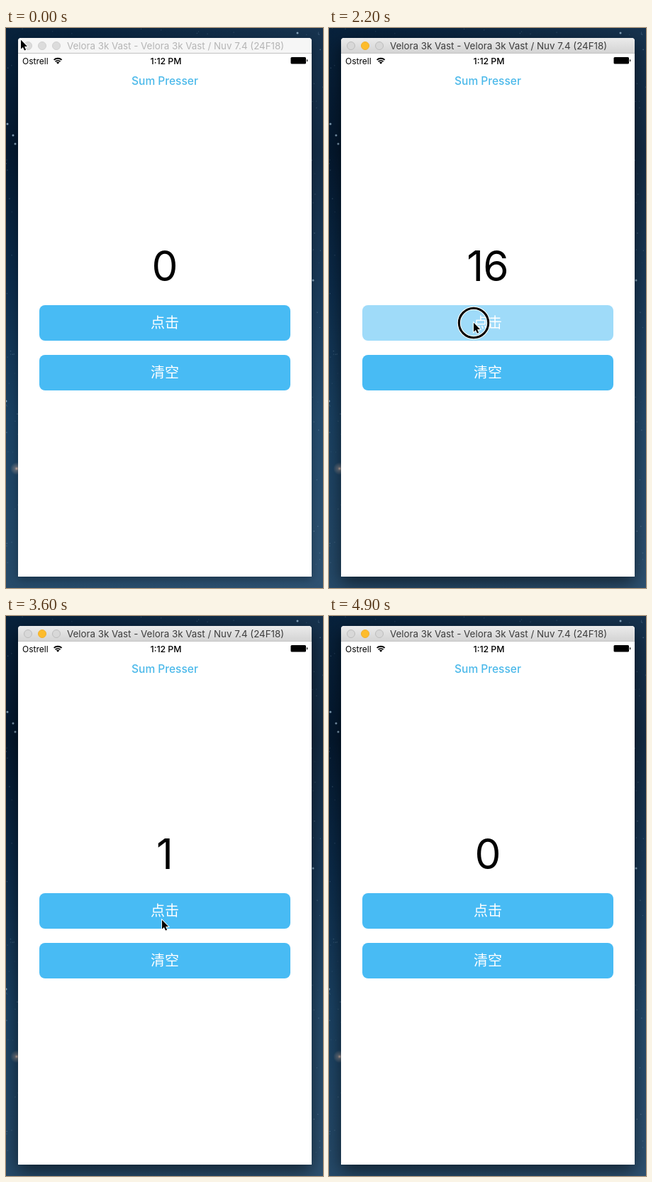
An HTML page that plays this animation: 447 by 788 pixels, repeating every 5000 ms.

```html
<!DOCTYPE html>
<html lang="zh-CN">
<head>
<meta charset="utf-8">
<title>Counter</title>
<style>
  html, body { margin: 0; width: 100%; height: 100%; overflow: hidden; background: #0b2744; }
  svg { display: block; width: 447px; height: 788px; font-family: Inter, "Open Sans", sans-serif; }
  .mid { text-anchor: middle; }
  .shadow { fill: #fff; filter: drop-shadow(0 4px 6px rgba(0, 0, 0, .3)); }
  .bar { fill: #f6f6f6; }
  .title { font-size: 13.35px; fill: #b5b5b5; }
  .light { fill: #dcdcdc; stroke: #d0d0d0; }
  .active .shadow { filter: drop-shadow(0 9px 12px rgba(0, 0, 0, .55)); }
  .active .bar { fill: url(#chrome); }
  .active .title { fill: #3c3c3c; }
  .active .light { fill: #d8d8d8; stroke: #bdbdbd; }
  .active .light.min { fill: #fdbc2c; stroke: #f0b02e; }
  .button rect { fill: #48bbf4; }
  .button text { fill: #fff; font: 300 20px "Noto Sans CJK SC", "Noto Sans CJK", sans-serif; }
  .pressed { opacity: .52; }
  #count { font-size: 58.5px; letter-spacing: -.8px; }
</style>
</head>
<body>
<svg id="stage" viewBox="0 0 447 788">
  <defs>
    <linearGradient id="sky" x2="0" y2="1">
      <stop offset="0" stop-color="#08223c"/>
      <stop offset=".22" stop-color="#04182e"/>
      <stop offset=".45" stop-color="#0b2a48"/>
      <stop offset=".7" stop-color="#1a4162"/>
      <stop offset="1" stop-color="#264a69"/>
    </linearGradient>
    <linearGradient id="haze">
      <stop offset=".2" stop-color="#46698a" stop-opacity="0"/>
      <stop offset="1" stop-color="#46698a" stop-opacity=".24"/>
    </linearGradient>
    <linearGradient id="chrome" x2="0" y2="1">
      <stop offset="0" stop-color="#ebebeb"/>
      <stop offset="1" stop-color="#d3d3d3"/>
    </linearGradient>
    <radialGradient id="glow">
      <stop offset="0" stop-color="#e6c4b2"/>
      <stop offset=".3" stop-color="#a99a96" stop-opacity=".5"/>
      <stop offset="1" stop-color="#a99a96" stop-opacity="0"/>
    </radialGradient>
  </defs>

  <rect width="447" height="788" fill="url(#sky)"/>
  <rect width="447" height="788" fill="url(#haze)"/>
  <g id="stars" fill="#a9c9e2"></g>
  <circle cx="15" cy="620" r="9" fill="url(#glow)"/>

  <rect class="shadow" x="17" y="14" width="414" height="758" rx="4"/>
  <rect x="17" y="40" width="414" height="732" fill="#fff"/>
  <path class="bar" d="M17 36V19q0-5 5-5H426q5 0 5 5V36Z"/>
  <path d="M17 35.5H431" stroke="#c3c3c3"/>
  <circle class="light" cx="31" cy="25" r="5.5"/>
  <circle class="light min" cx="51" cy="25" r="5.5"/>
  <circle class="light" cx="71" cy="25" r="5.5"/>
  <text class="title mid" x="239" y="30">Velora 3k Vast - Velora 3k Vast / Nuv 7.4 (24F18)</text>

  <text x="23" y="51" font-size="12">Ostrell</text>
  <g fill="none" stroke="#000" stroke-width="1.9">
    <path d="M67.6 44.9a8 8 0 0 1 11 0M69.7 47.2a5 5 0 0 1 6.8 0"/>
    <path d="M71 48.4q2.1-1.6 4.2 0L73.1 50.8Z" fill="#000" stroke="none"/>
  </g>
  <text class="mid" x="225.5" y="51" font-size="12.3" font-weight="500">1:12 PM</text>
  <rect x="401.5" y="41" width="21.5" height="9.5" rx="1.5"/>
  <path d="M424 44q1.3.3 1.3 1.8t-1.3 1.8Z"/>
  <text class="mid" x="224" y="80" font-size="15.5" font-weight="500" fill="#4bb9ea">Sum Presser</text>

  <text id="count" class="mid" x="223.5" y="356">0</text>
  <g id="tap" class="button">
    <rect x="47" y="390" width="354" height="50" rx="8"/>
    <text class="mid" x="224" y="422">点击</text>
  </g>
  <g id="clear" class="button">
    <rect x="47" y="460" width="354" height="50" rx="8"/>
    <text class="mid" x="224" y="492">清空</text>
  </g>

  <g id="pointer">
    <g id="ring" fill="none">
      <circle cx="1" cy="2" r="20.7" stroke="#fff" stroke-width="5"/>
      <circle cx="1" cy="2" r="20.7" stroke="#000" stroke-width="3"/>
    </g>
    <path d="M1 1.8V14.6L3.9 11.9L6 16.6L8.1 15.7L6.1 11.1H10Z" stroke="#fff" stroke-width="1.8" paint-order="stroke"/>
  </g>
</svg>
<script>
  const LOOP = 5000, STEP = 100;
  const el = id => document.getElementById(id);

  // Pointer stops: step, x, y
  const stops = [
    [0, 20, 15], [6, 203, 413], [25, 203, 413], [27, 197, 486], [29, 197, 486],
    [33, 219, 426], [42, 219, 426], [44, 200, 486], [46, 200, 486], [49, 460, 520]
  ];

  function pointerAt(step) {
    const i = Math.max(1, stops.findIndex(s => s[0] >= step));
    const [t0, x0, y0] = stops[i - 1], [t1, x1, y1] = stops[i];
    const p = (step - t0) / (t1 - t0), e = p * p * (3 - 2 * p);
    return [x0 + (x1 - x0) * e, y0 + (y1 - y0) * e];
  }

  function countAt(step) {
    if (step < 7) return 0;
    if (step < 29) return Math.min(20, Math.floor((step - 7) * 10 / 9));
    if (step < 35) return 0;
    if (step < 41) return 1;
    return step < 46 ? 2 : 0;
  }

  function addStars() {
    let seed = 17, dots = "";
    const rnd = () => (seed = seed * 16807 % 2147483647) / 2147483647;
    const star = (x, y, r, o) => dots += `<circle cx="${x}" cy="${y}" r="${r}" opacity="${o}"/>`;
    for (let i = 0; i < 60; i++) {
      const x = i % 2 ? rnd() * 17 : 431 + rnd() * 16;
      star(x, rnd() * 788, .5 + rnd() * .5, .1 + rnd() * .25);
    }
    for (let i = 0; i < 14; i++) star(rnd() * 447, rnd() * 13, .6, .25);
    [[2, 135], [10, 151], [13, 163], [0, 525], [433, 355], [411, 7]].forEach(([x, y]) => star(x, y, 1.5, .75));
    el("stars").innerHTML = dots;
  }

  function draw(now) {
    const step = Math.floor(now % LOOP / STEP);
    const tapping = step >= 6 && step < 25;
    const tapDown = tapping && step > 7 && step % 2 === 0 || step === 34 || step === 40;
    const clearDown = step === 28 || step === 45;
    const [x, y] = pointerAt(step);
    el("stage").classList.toggle("active", step >= 6);
    el("count").textContent = countAt(step);
    el("tap").classList.toggle("pressed", tapDown);
    el("clear").classList.toggle("pressed", clearDown);
    el("ring").style.display = tapping || tapDown || clearDown ? "" : "none";
    el("pointer").setAttribute("transform", `translate(${x} ${y})`);
  }

  addStars();
  const start = performance.now();
  function tick() {
    draw(performance.now() - start);
    requestAnimationFrame(tick);
  }
  tick();
</script>
</body>
</html>
```
